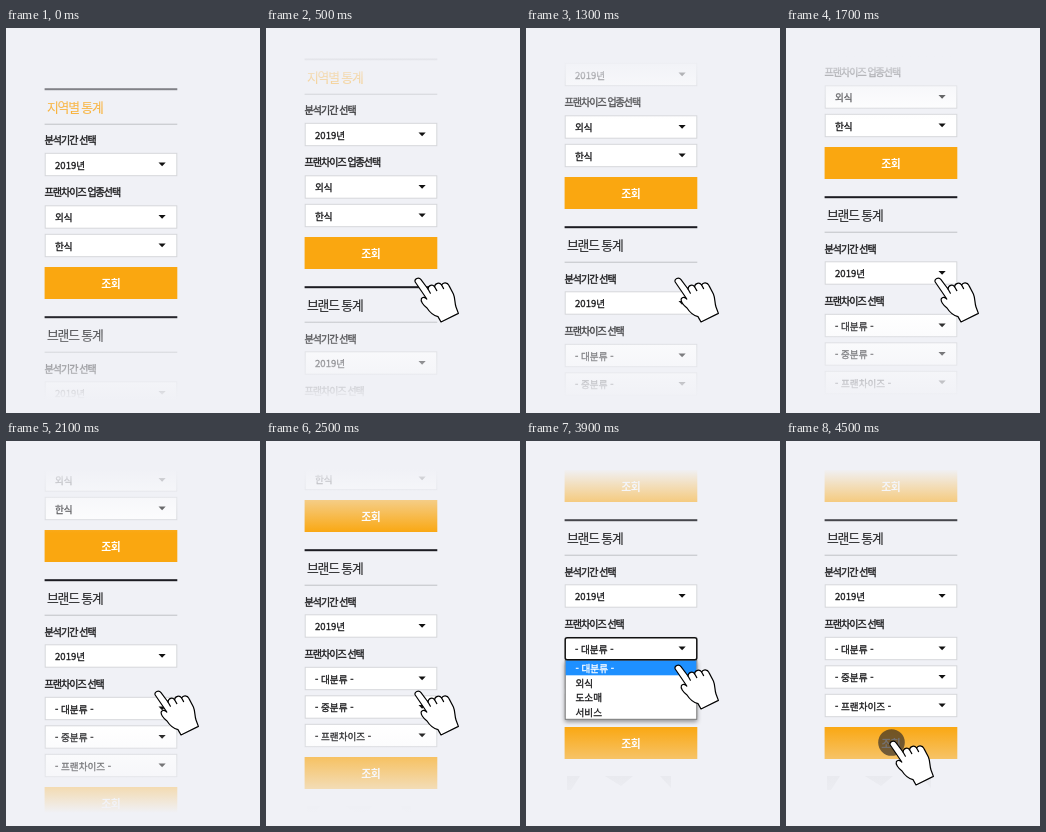
Recreate the animation shown at these times as an HTML page. Size 254 by 385 pixels, loop 7.5 s.

```html
<!DOCTYPE html>
<html lang="ko">
<head>
<meta charset="utf-8">
<style>
  html, body { margin: 0; width: 100%; height: 100%; overflow: hidden; background: #f0f1f6; }
  svg { display: block; width: 254px; height: 385px; }
  text { font-family: "Noto Sans CJK KR", "Noto Sans CJK", "Noto Sans", sans-serif; fill: #1c1c1e; }
  .title { font-size: 12.8px; letter-spacing: -1.15px; stroke-width: .12px; }
  .label { font-size: 10px; letter-spacing: -1px; stroke: #1c1c1e; stroke-width: .35px; }
  .value { font-size: 9.6px; stroke: #1c1c1e; stroke-width: .3px; }
  .value.chosen { fill: #fff; stroke: #fff; }
  .action { font-size: 10.8px; font-weight: 700; fill: #fff; text-anchor: middle; letter-spacing: -.6px; }
</style>
</head>
<body>
<svg viewBox="0 0 254 385">
  <defs>
    <linearGradient id="topFade" gradientUnits="userSpaceOnUse" x1="0" y1="28" x2="0" y2="92">
      <stop offset="0" stop-color="#f0f1f6"/><stop offset="1" stop-color="#f0f1f6" stop-opacity="0"/>
    </linearGradient>
    <linearGradient id="bottomFade" gradientUnits="userSpaceOnUse" x1="0" y1="285" x2="0" y2="372">
      <stop offset="0" stop-color="#f0f1f6" stop-opacity="0"/><stop offset="1" stop-color="#f0f1f6"/>
    </linearGradient>
    <filter id="shadow" x="-10%" y="-10%" width="120%" height="130%">
      <feDropShadow dx="0" dy="2" stdDeviation="2.2" flood-opacity=".4"/>
    </filter>
  </defs>
  <rect width="254" height="385" fill="#f0f1f6"/>
  <g id="page"></g>
  <rect width="254" height="100" fill="url(#topFade)"/>
  <rect y="280" width="254" height="105" fill="url(#bottomFade)"/>
  <g id="menu"></g>
  <circle id="press" r="13.3" fill="#2c2828" fill-opacity=".66"/>
  <g id="hand" fill="#fff" stroke="#000" stroke-width="1.2" stroke-linejoin="round" stroke-linecap="round">
    <path d="M1.2 5C0 2 4.6-.6 7 2.6L14 12C14.4 8 18.6 7 20.6 9.8C21 6 25.6 5 27.6 8C29 5 33.4 5 35 8.6L39.4 17C41.2 21 40.6 26 42 30L44.4 36.4L27 45L24 39.6C19.5 38.5 15.5 35 13 31C9.4 28.4 6.2 24 7.4 21.6C8.6 19.6 11 20 12.8 22Z"/>
    <path fill="none" d="M14 12l2.4 4.2M20.6 9.8l2.2 3.8M27.6 8l2 3.6"/>
  </g>
</svg>
<script>
const LOOP = 7500, LEFT = 38.6, WIDTH = 132.7;
const $ = id => document.getElementById(id);

const text = (kind, x, middle, content, style = '') =>
  `<text class="${kind}" x="${x}" y="${middle + (kind === 'title' ? 4.8 : 3.8)}" style="${style}">${content}</text>`;
const bar = (y, height, fill) =>
  `<rect x="${LEFT}" y="${y}" width="${WIDTH}" height="${height}" fill="${fill}"/>`;
const arrow = y => `<path d="M152.5 ${y - 2}h7.2l-3.6 3.8z" fill="#111"/>`;
const label = (y, content) => text('label', LEFT, y, content);
const select = (y, content) =>
  `<rect x="39.2" y="${y + .3}" width="131.6" height="22.4" fill="#fff" stroke="#d6d7db"/>` +
  text('value', 49, y + 11.7, content) + arrow(y + 11.5);
const button = y => bar(y, 32, '#faa710') + text('action', 104.7, y + 17, '조회');
const heading = (y, content, color) =>
  bar(y, 2, '#1c1c22') +
  text('title', 41, y + 18.5, content, `fill:${color};stroke:${color}`) +
  bar(y + 35.5, 1, '#bfc0c5');

$('page').innerHTML =
  heading(60.2, '지역별 통계', '#faa81c') +
  label(112, '분석기간 선택') + select(125, '2019년') +
  label(164, '프랜차이즈 업종선택') + select(177.5, '외식') + select(206, '한식') +
  button(239) +
  heading(288.2, '브랜드 통계', '#262628') +
  label(341, '분석기간 선택') + select(353.5, '2019년') +
  label(393, '프랜차이즈 선택') +
  select(406, '- 대분류 -') + select(434.5, '- 중분류 -') + select(463, '- 프랜차이즈 -') +
  button(496) +
  '<path d="M41 545h13l-9 14h-4zM79 545h28l-12 10zM134 545h11v12z" fill="#dfe0e5"/>';

const options = ['- 대분류 -', '외식', '도소매', '서비스'];
$('menu').innerHTML =
  '<rect x="39.2" y="219.3" width="131.6" height="59" fill="#fff" stroke="#777" filter="url(#shadow)"/>' +
  '<rect x="39.7" y="219.5" width="130.6" height="14.8" fill="#1e90ff"/>' +
  options.map((name, i) => text(i ? 'value' : 'value chosen', 49.5, 227 + i * 14.7, name)).join('') +
  '<rect x="39.2" y="196.8" width="131.6" height="22" rx="2" fill="#fff" stroke="#111" stroke-width="1.5"/>' +
  text('value', 49, 207.7, options[0]) + arrow(207.5);

const show = (id, visible) => $(id).setAttribute('display', visible ? 'inline' : 'none');
const move = (id, x, y) => $(id).setAttribute('transform', `translate(${x} ${y})`);

// The hand grabs low, drags the page up 30px, and repeats seven times.
function handPosition(t) {
  if (t >= 4400) return [103, 299];
  if (t >= 3900) return [148, 223];
  if (t >= 3100) return [148, 203];
  return [148, Math.floor((t - 300) / 200) % 2 ? 249 : 279];
}

function render(t) {
  const drags = Math.min(7, Math.max(0, Math.floor((t - 100) / 400)));
  const [x, y] = handPosition(t);
  move('page', 0, -30 * drags);
  move('hand', x, y);
  move('press', x + 2.5, y + 2.5);
  show('hand', t >= 300);
  show('press', (t >= 3400 && t < 3600) || t >= 4500);
  show('menu', t >= 3600 && t < 4400);
}

const start = performance.now();
function tick() {
  render((performance.now() - start) % LOOP);
  requestAnimationFrame(tick);
}
tick();
</script>
</body>
</html>
```
